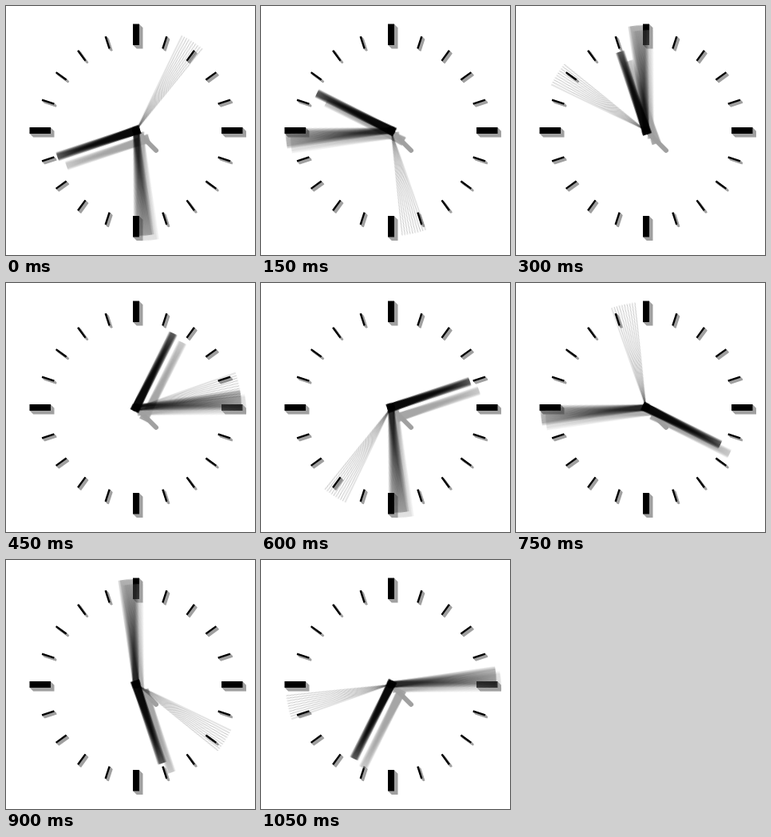
Animation, 312 px wide and 312 px high, one loop 1200 ms. Source, as an HTML page:

```html
<!DOCTYPE html>
<html lang="en">
<head>
<meta charset="utf-8">
<title>Spinning clock</title>
<style>
  html, body { margin: 0; width: 100%; height: 100%; overflow: hidden; background: #fff; }
  svg { display: block; width: 100%; height: 100%; }
  .spin { animation: spin 1.2s steps(8) infinite; }
  @keyframes spin {
    from { transform: rotate(var(--from)); }
    to { transform: rotate(calc(var(--from) + var(--turns) * 360deg)); }
  }
</style>
</head>
<body>
<svg viewBox="0 0 312 312"><g id="clock" transform="translate(163 156)"></g></svg>
<script>
const SHADE = '#a0a0a0';
const SAMPLES = 10;
const clock = document.getElementById('clock');

function add(parent, tag, attrs) {
  const el = document.createElementNS('http://www.w3.org/2000/svg', tag);
  for (const key in attrs) el.setAttribute(key, attrs[key]);
  return parent.appendChild(el);
}

// Twenty ticks, each with a solid shadow extruded down and right.
function tick(index, color, shift) {
  const large = index % 5 === 0;
  const [inner, outer, width] = large ? [107, 133.5, 8] : [108, 124, 2.4];
  add(clock, 'path', {
    d: `M0 ${-inner}V${-outer}`, stroke: color, 'stroke-width': width,
    transform: `translate(${shift} ${shift}) rotate(${index * 18})`
  });
}

function drawTicks() {
  for (let i = 0; i < 20; i++) {
    const depth = i % 5 ? 3 : 4.5;
    for (let s = 0.5; s <= depth; s += 0.5) tick(i, SHADE, s);
    tick(i, '#000', 0);
  }
}

// A fan of translucent copies gives each hand its motion blur.
function drawHand({ from, turns, sweep, length, base, tip, tail, alpha }, color, shift = 0) {
  const holder = add(clock, 'g', { transform: `translate(${shift} ${shift})` });
  const hand = add(holder, 'g', {
    class: 'spin', fill: color, 'fill-opacity': alpha,
    style: `--from:${from}deg;--turns:${turns}`
  });
  for (let i = 0; i < SAMPLES; i++) {
    add(hand, 'path', {
      d: `M${-base / 2} ${tail}L${-tip / 2} ${-length}H${tip / 2}L${base / 2} ${tail}Z`,
      transform: `rotate(${sweep * i / (SAMPLES - 1)})`
    });
  }
}

const hour = { from: 249.4, turns: 1, sweep: 4.5, length: 104, base: 11, tip: 3, tail: 5, alpha: 0.27 };
const minute = { from: 171.2, turns: 2, sweep: 9, length: 132, base: 8, tip: 4.5, tail: 4, alpha: 0.17 };
const second = { from: 25.9, turns: 3, sweep: 13, length: 132, base: 0.9, tip: 0.9, tail: 0, alpha: 0.24 };

drawTicks();
add(clock, 'path', { d: 'M3 3L25 25', stroke: SHADE, 'stroke-width': 6, 'stroke-linecap': 'round' });
drawHand({ ...hour, alpha: 0.22 }, SHADE, 11.5);
drawHand({ ...minute, alpha: 0.17 }, SHADE, 6);
drawHand(hour, '#000');
drawHand(minute, '#000');
drawHand(second, '#000');
add(clock, 'circle', { r: 5 });
</script>
</body>
</html>
```
